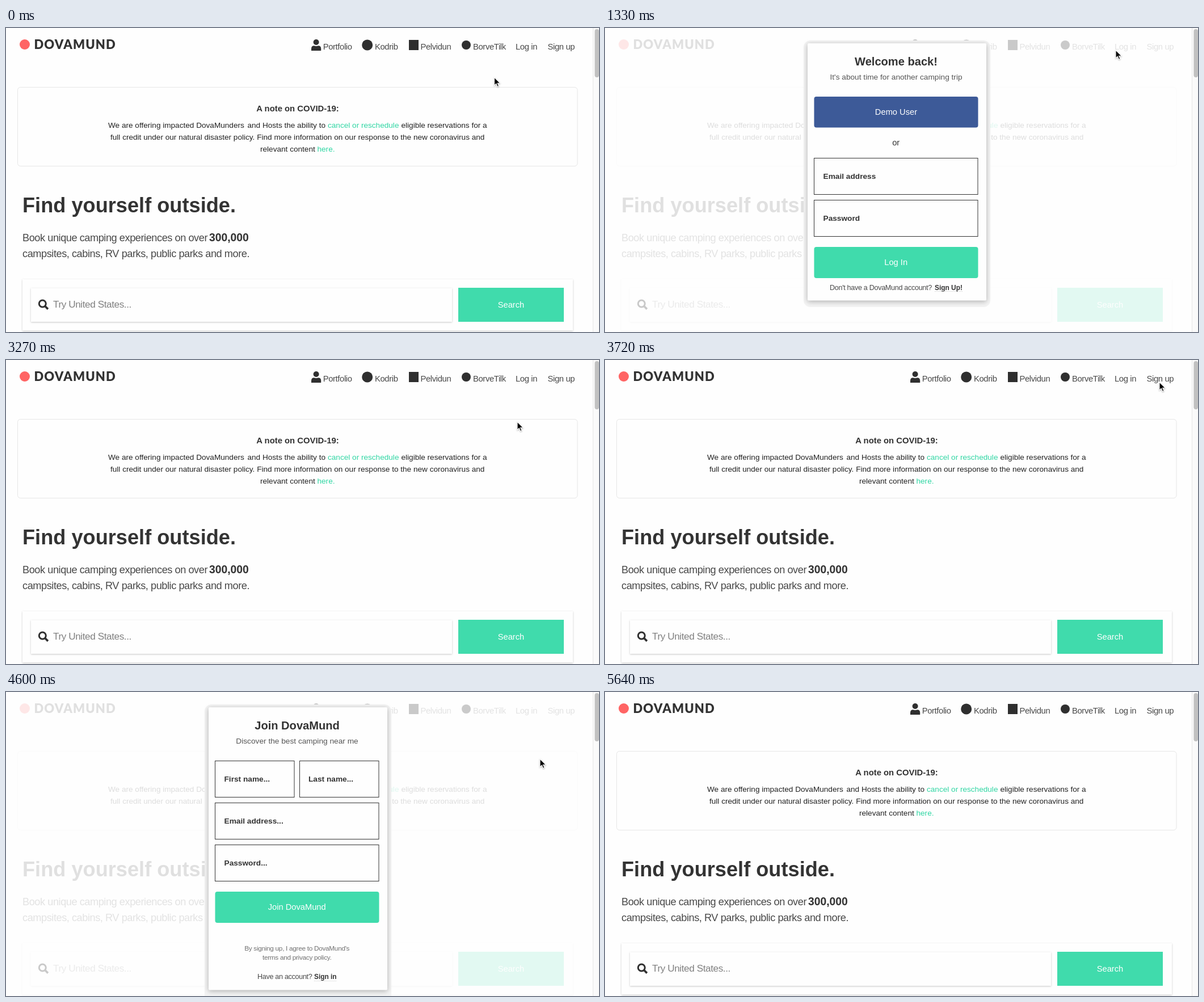
An HTML page for the animation above (6.09 s loop, 1045x536 px).

```html
<!DOCTYPE html>
<html lang="en">
<head>
<meta charset="utf-8">
<title>Camping home page</title>
<style>
  html, body { margin: 0; width: 100%; height: 100%; overflow: hidden; background: #fefefe; }
  svg { display: block; width: 100vw; height: 100vh; }
  text { font: 14.7px "Liberation Sans", Arial, sans-serif; fill: #333; }
  .mid { text-anchor: middle; }
  .bold { font-weight: bold; }
  .light { letter-spacing: -.025em; fill: #484848; }
  .brand { font: 900 22px Lato, sans-serif; letter-spacing: 1.1px; }
  .nav { font-size: 14.8px; }
  .note { font-size: 13.6px; fill: #222; }
  .link { fill: #2fd6a3; }
  .lead { font-size: 18.2px; }
  .hint { font-size: 17.2px; fill: #808080; }
  .title { font-size: 20.1px; font-weight: bold; }
  .sub { font-size: 13.7px; fill: #555; }
  .label { font-size: 13.7px; font-weight: bold; }
  .small { font-size: 12.6px; }
  .strong { font-size: 11.9px; font-weight: bold; }
  .terms { font-size: 11.8px; fill: #707070; }
  .white { fill: #fff; }
  .green { fill: #40dbac; }
  .blue { fill: #3d5a98; }
  .field { fill: #fefefe; stroke: #333; }
  .card { fill: #fefefe; filter: drop-shadow(.5px 1.5px 1.5px rgba(0, 0, 0, .22)); }
  .halo { fill: #f3f3f3; }
  .sheet { fill: #fefefe; filter: drop-shadow(0 2px 4px rgba(0, 0, 0, .28)); }
  .under { stroke: #ccc; stroke-dasharray: 1 1; }
</style>
</head>
<body>
<svg viewBox="0 0 1045 536">
  <rect width="1045" height="536" fill="#fefefe"/>

  <g id="page">
    <circle cx="33" cy="29" r="9" fill="#ff6464"/>
    <text class="brand" x="49.5" y="37">DOVAMUND</text>
    <text class="nav light" x="558.7" y="38">Portfolio</text>
    <text class="nav light" x="650" y="38">Kodrib</text>
    <text class="nav light" x="730.5" y="38">Pelvidun</text>
    <text class="nav light" x="823" y="38">BorveTilk</text>
    <text class="nav light" x="898" y="38">Log in</text>
    <text class="nav light" x="954.5" y="38">Sign up</text>

    <rect x="20.5" y="104.5" width="986.5" height="139" rx="5" fill="none" stroke="#e6e6e6"/>
    <text class="mid bold" style="font-size:14.85px" x="514" y="147">A note on COVID-19:</text>
    <text class="note" x="180" y="176">We are offering impacted DovaMunders</text>
    <text class="note" x="563" y="176" text-anchor="end">and Hosts the ability to</text>
    <text class="note link" x="567" y="176">cancel or reschedule</text>
    <text class="note" x="696.5" y="176">eligible reservations for a</text>
    <text class="note mid" x="513.7" y="197">full credit under our natural disaster policy. Find more information on our response to the new coronavirus and</text>
    <text class="note" x="448" y="218">relevant content</text>
    <text class="note link" x="548.5" y="218">here.</text>

    <text class="bold" style="font-size:36.2px" x="29" y="325">Find yourself outside.</text>
    <text class="lead light" x="29" y="376">Book unique camping experiences on over</text>
    <text class="bold" style="font-size:19.3px" x="358" y="376">300,000</text>
    <text class="lead light" x="29" y="404">campsites, cabins, RV parks, public parks and more.</text>

    <rect class="card" x="29" y="443" width="970" height="90.5"/>
    <rect class="card" x="44" y="458.5" width="742" height="59.5"/>
    <text class="hint light" style="fill:#808080" x="83" y="493">Try United States...</text>
    <rect class="green" x="797" y="458" width="186" height="60"/>
    <text class="mid white" x="890" y="493">Search</text>
  </g>

  <rect id="veil" width="1034" height="536" fill="#fefefe" opacity=".85"/>

  <g id="icons" fill="#2f2f2f">
    <circle cx="546.6" cy="25" r="5"/>
    <path d="M538 40V36.5Q538 31.3 543 31.3Q546.6 32.6 550.2 31.3Q555.2 31.3 555.2 36.5V40Z"/>
    <circle cx="636.7" cy="30" r="9.5"/>
    <rect x="710" y="21" width="17" height="18"/>
    <circle cx="811" cy="30" r="8"/>
    <g fill="none" stroke="#2f2f2f" stroke-width="3">
      <circle cx="64.3" cy="486" r="6"/>
      <path d="M68.6 490.3L74 495.6" stroke-width="3.6"/>
    </g>
  </g>

  <rect x="1034" width="11" height="536" fill="#fafafa"/>
  <path d="M1034.5 0V536" stroke="#e8e8e8"/>
  <rect x="1037.5" y="2" width="7.5" height="85" rx="3.7" fill="#c1c1c1"/>

  <g id="login">
    <rect class="halo" x="350" y="22" width="329" height="470" rx="12"/>
    <rect class="sheet" x="357" y="27" width="315" height="453.5" rx="2"/>
    <text class="title mid" x="513" y="66">Welcome back!</text>
    <text class="sub mid" x="513" y="91">It's about time for another camping trip</text>
    <rect class="blue" x="368.5" y="121" width="289" height="54.5" rx="4"/>
    <text class="mid white" x="513" y="153">Demo User</text>
    <text class="mid" x="512.7" y="207">or</text>
    <rect class="field" x="368.5" y="229.5" width="288.5" height="64"/>
    <text class="label" x="384.5" y="266">Email address</text>
    <rect class="field" x="368.5" y="303.5" width="288.5" height="64"/>
    <text class="label" x="384.5" y="340">Password</text>
    <rect class="green" x="368.5" y="386" width="289" height="55" rx="4"/>
    <text class="mid white" x="512.7" y="418">Log In</text>
    <text class="small light" x="396" y="461.5">Don't have a DovaMund account?</text>
    <text class="strong" x="581" y="461.5">Sign Up!</text>
    <path class="under" d="M581 464.5H630"/>
  </g>

  <g id="join">
    <rect class="halo" x="350" y="22" width="329" height="530" rx="12"/>
    <rect class="sheet" x="357" y="27" width="315" height="498.5" rx="2"/>
    <text class="title mid" x="513" y="66">Join DovaMund</text>
    <text class="sub mid" x="513" y="91">Discover the best camping near me</text>
    <rect class="field" x="368.5" y="121.5" width="139.5" height="64"/>
    <text class="label" x="384.5" y="158">First name...</text>
    <rect class="field" x="517.5" y="121.5" width="139.5" height="64"/>
    <text class="label" x="533" y="158">Last name...</text>
    <rect class="field" x="368.5" y="195.5" width="288.5" height="64"/>
    <text class="label" x="384.5" y="232">Email address...</text>
    <rect class="field" x="368.5" y="269.5" width="288.5" height="64"/>
    <text class="label" x="384.5" y="306">Password...</text>
    <rect class="green" x="368.5" y="352" width="289" height="55" rx="4"/>
    <text class="mid white" x="512.7" y="384">Join DovaMund</text>
    <text class="light terms mid" x="512.7" y="456">By signing up, I agree to DovaMund's</text>
    <text class="light terms mid" x="512.7" y="472">terms and privacy policy.</text>
    <text class="small light" x="443" y="506">Have an account?</text>
    <text class="strong" x="543" y="506">Sign in</text>
    <path class="under" d="M543 509.5H582"/>
  </g>

  <path id="cursor" d="M0 0V14.2L3.3 11.1L5.6 16.5L8 15.5L5.7 10.2H10.2Z" fill="#000" stroke="#fff" stroke-width="1.1"
    style="filter:drop-shadow(0 1px 1px rgba(0,0,0,.3))"/>
</svg>
<script>
  const LOOP = 6090;
  // Pointer stops: start time, x, y; each holds until the next.
  const stops = [
    [0, 860.5, 87], [150, 866, 82], [300, 890, 68], [450, 915, 55], [590, 929, 48], [740, 910, 41], [880, 900, 39],
    [1930, 905, 50], [2080, 909, 78], [2230, 893, 108], [2380, 878, 128],
    [3270, 901, 109], [3420, 930, 80], [3570, 962, 50], [3720, 977, 39],
    [4160, 975, 50], [4300, 962, 80], [4450, 948, 108], [4600, 941, 118],
    [5050, 941, 102], [5200, 965, 92], [5340, 1000, 80], [5490, 1032, 70], [5640, 1100, 66]
  ];
  const $ = id => document.getElementById(id);
  const show = (id, on) => { $(id).style.display = on ? "" : "none"; };

  function draw(t) {
    const login = t >= 1330 && t < 3270;
    const join = t >= 4010 && t < 5050;
    show("login", login);
    show("join", join);
    show("veil", login || join);
    $("icons").setAttribute("opacity", login || join ? .25 : 1);
    const [, x, y] = stops.findLast(s => s[0] <= t);
    $("cursor").setAttribute("transform", `translate(${x} ${y})`);
  }

  const start = performance.now();
  function tick() {
    draw((performance.now() - start) % LOOP);
    requestAnimationFrame(tick);
  }
  tick();
</script>
</body>
</html>
```
